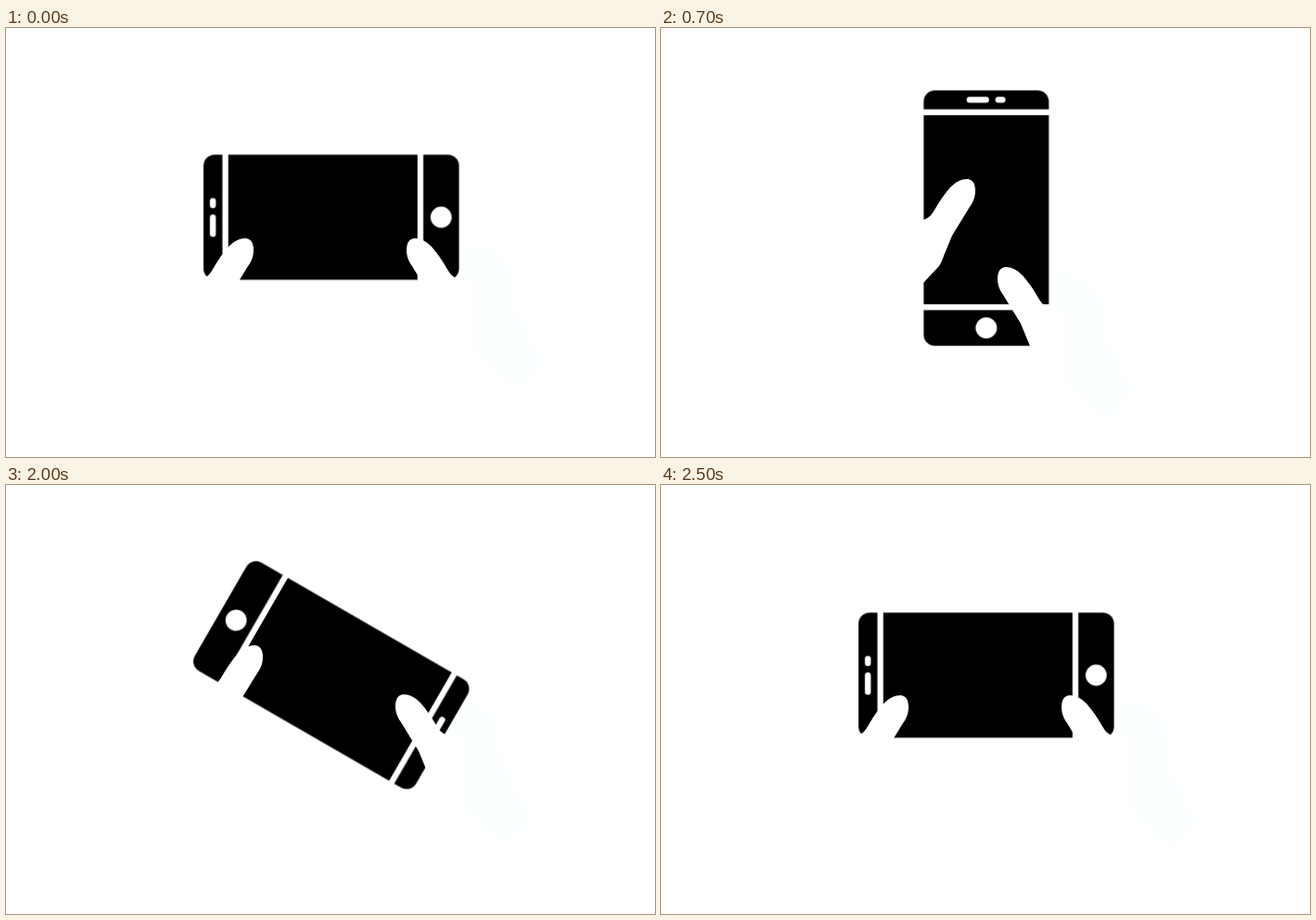
These frames come from a looping animation (700x463 px, 3.5 s). An HTML page without scripts:

```html
<!DOCTYPE html>
<html lang="en">
<head>
<meta charset="utf-8">
<title>Rotating phone</title>
<style>
html, body { margin: 0; width: 100%; height: 100%; overflow: hidden; background: #fff; }
svg { display: block; width: 700px; height: 463px; }
.phone, .left, .right { animation: 3500ms step-end infinite; }
.phone { animation-name: turn; }
.left { animation-name: left; }
.right { animation-name: right; }
.white { fill: #fff; }

/* each turn: six hard steps of 30 degrees, 100 ms apart */
@keyframes turn {
  0% { transform: translateY(-1px); }
  14.285% { transform: rotate(30deg); }
  17.142% { transform: rotate(60deg); }
  20% { transform: rotate(90deg); }
  22.857% { transform: rotate(120deg); }
  25.714% { transform: rotate(150deg); }
  28.571% { transform: rotate(180deg); }
  57.142% { transform: rotate(210deg); }
  60% { transform: rotate(240deg); }
  62.857% { transform: rotate(270deg); }
  65.714% { transform: rotate(300deg); }
  68.571% { transform: rotate(330deg); }
  71.428%, 100% { transform: rotate(360deg); }
}
@keyframes left {
  0%, 28.571%, 71.428%, 100% { transform: none; }
  14.285%, 57.142% { transform: translate(10px, -54px); }
  17.142%, 60% { transform: translate(42px, -62px); }
  20% { transform: translate(72px, -64px); }
  62.857% { transform: translate(72px, 31px); }
  22.857%, 65.714% { transform: translate(42px, 14px); }
  25.714%, 68.571% { transform: translate(12px, -1px); }
}
@keyframes right {
  0%, 28.571%, 71.428%, 100% { transform: none; }
  14.285%, 57.142% { transform: translate(-12px, -1px); }
  17.142%, 60% { transform: translate(-42px, 14px); }
  20%, 62.857% { transform: translate(-69px, 31px); }
  22.857%, 65.714% { transform: translate(-42px, -62px); }
  25.714%, 68.571% { transform: translate(-10px, -54px); }
}
</style>
</head>
<body>
<svg viewBox="0 0 700 463">
  <defs>
    <path id="thumb" d="M211 271C218 269 221 264 225 257C229 250 234 243 240 236C246 230 252 227 258 227
      C264 227 267 232 267 240C267 247 264 253 261 257L242 288L235 305C232 312 230 319 227 322L211 339L196 345V272Z"/>
  </defs>

  <g class="right">
    <path fill="#fbffff" d="M499 231L522 239Q538 246 543 268L547 302L575 358Q577 363 571 368L553 389Q547 391 540 382L500 342L470 312L488 271Z"/>
  </g>

  <g transform="translate(350.8 205.2)">
    <g class="phone">
      <rect x="-137.8" y="-67.4" width="275.6" height="134.8" rx="12"/>
      <g class="white">
        <rect x="-117.4" y="-68.5" width="6.3" height="137"/>
        <rect x="93" y="-68.5" width="6.3" height="137"/>
        <rect x="-130.9" y="-20.7" width="6.4" height="11" rx="3.2"/>
        <rect x="-130.9" y="-3" width="6.4" height="24.2" rx="3.2"/>
        <circle cx="118.5" r="11.4"/>
      </g>
    </g>
  </g>

  <g class="white">
    <g class="left"><use href="#thumb"/></g>
    <g class="right"><use href="#thumb" transform="matrix(-1 0 0 1 699 0)"/></g>
  </g>
</svg>
</body>
</html>
```
